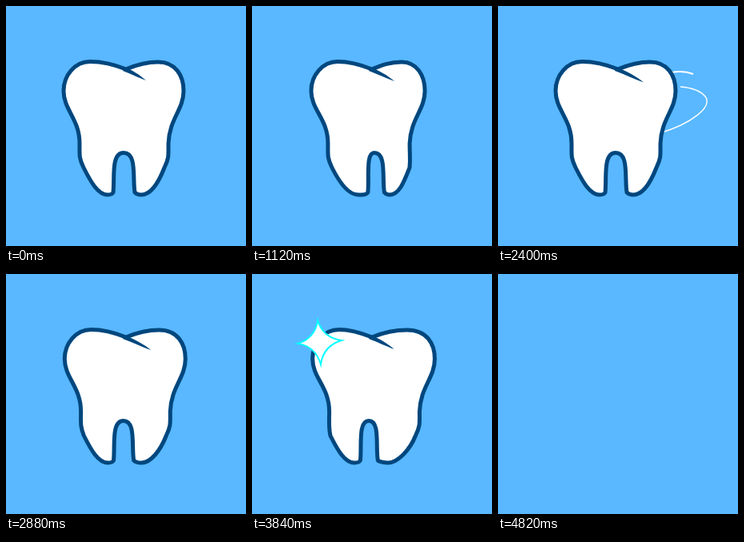
An HTML page that plays this animation: 300x300 px, repeating every 4840 ms.

```html
<!DOCTYPE html>
<html lang="en">
<head>
<meta charset="utf-8">
<title>Sparkling tooth</title>
<style>
  html, body { margin: 0; width: 100%; height: 100%; overflow: hidden; background: #59b8ff; }
  svg { display: block; width: 100%; height: 100%; }
</style>
</head>
<body>
<svg viewBox="0 0 300 300">
  <defs>
    <linearGradient id="fade" gradientUnits="userSpaceOnUse" x1="36" y1="0" x2="266" y2="0">
      <stop offset="0" stop-color="#fff" stop-opacity=".35"/>
      <stop offset="1" stop-color="#fff" stop-opacity=".7"/>
    </linearGradient>
  </defs>
  <g id="scene">
    <g fill="none">
      <g stroke="url(#fade)">
        <path id="orbit1" pathLength="1" d="M45 114C20 130 45 160 97 166C130 171 165 172 198 165C240 152 273 121 264 107C259 99 246 96 231 97"/>
        <path id="dash1" pathLength="1" d="M219 80Q232 76.500 245 78.500"/>
      </g>
      <g stroke="#fff">
        <path id="orbit2" pathLength="1" stroke-width="1.400" d="M38 114C10 130 38 160 96 168C130 172 166 170 202 159C242 147 269 126 259 113C253 106 241 102 228 101"/>
        <path id="dash2" pathLength="1" stroke-width="2" d="M217 83Q232 80.500 244 85"/>
      </g>
    </g>
    <path id="tooth" fill="#fff" stroke="#00477e" stroke-width="5" stroke-linejoin="round"/>
    <path id="crease" fill="#00477e"/>
    <path id="star" fill="#fff" stroke="#0ff" stroke-width="2" stroke-miterlimit="8"
      d="M0-27Q5-5 28 0Q5 5 0 28Q-5 5-27 0Q-5-5 0-27Z"/>
  </g>
</svg>
<script>
const LOOP = 4840, QUARTER = LOOP / 4;
const el = id => document.getElementById(id);

// Eased 0..1 progress of t between two times
function ease(t, from, to) {
  const k = Math.min(1, Math.max(0, (t - from) / (to - from)));
  return k * k * (3 - 2 * k);
}

// Turn of the tooth: 0, 1, 0, -1, 0 at the quarters of the loop
const turnAt = t =>
  ease(t, 0, QUARTER) - ease(t, QUARTER, 2 * QUARTER)
  - ease(t, 2 * QUARTER, 3 * QUARTER) + ease(t, 3 * QUARTER, LOOP);

function toothPath(turn) {
  const part = (right, left) => x => x + (turn > 0 ? right * turn : -left * turn);
  const lobeL = part(2, 4), wallL = part(3, 5), shinL = part(3, 1), footL = part(6, 1),
        gapL = part(11, 1.5), gapTop = part(6, -1), gapR = part(4.5, -4),
        footR = part(3, 1), shinR = part(-1, 7), wallR = part(-6, 7),
        lobeR = part(-6, 7), topR = part(-3, 4);
  return `M150 79C130 71 118 69.5 ${lobeL(105)} 69.5
    C${lobeL(86)} 69.5 ${lobeL(72)} 87 ${lobeL(72)} 106
    C${lobeL(72)} 130 ${wallL(92)} 141 ${wallL(92)} 172
    C${wallL(92)} 186 ${wallL(91)} 190 ${shinL(97)} 202
    C${shinL(106)} 220 ${footL(115)} 236 ${footL(127)} 236
    C${gapL(131)} 236 ${gapL(133)} 235 ${gapL(134)} 233
    C${gapL(136)} 215 ${gapL(131)} 183.5 ${gapTop(147)} 183.5
    C${gapR(164)} 183.5 ${gapR(158)} 215 ${gapR(161)} 233
    C${gapR(163)} 235 ${footR(166)} 236 ${footR(169)} 236
    C${footR(181)} 236 ${shinR(191)} 220 ${shinR(198)} 202
    C${wallR(204)} 190 ${wallR(203)} 186 ${wallR(203)} 172
    C${wallR(204)} 141 ${lobeR(222)} 130 ${lobeR(222)} 106
    C${lobeR(222)} 87 ${lobeR(212)} 70 ${topR(190)} 70
    C${topR(175)} 70 162 74 150 79Z`;
}

function creasePath(slide) {
  const x = 175 + 7 * slide, y = 93 + 2.5 * slide;
  return `M147 76C158 80 ${x - 8} ${y - 7} ${x} ${y}C${x - 11} ${y - 4} 158 85.5 146 81Z`;
}

// Shows the stretch of a line between its tail and its head
function trim(id, head, tail) {
  const shown = head - tail;
  el(id).style.visibility = shown > 0.001 ? "visible" : "hidden";
  el(id).setAttribute("stroke-dasharray", `${shown} 2`);
  el(id).setAttribute("stroke-dashoffset", -tail);
}

function draw(t) {
  el("scene").style.display = t < 4815 ? "" : "none";
  el("tooth").setAttribute("d", toothPath(turnAt(t)));
  el("crease").setAttribute("d", creasePath(ease(t, 0, LOOP / 2) - ease(t, LOOP / 2, LOOP)));

  trim("orbit1", ease(t, 100, 580), ease(t, 600, 1080));
  trim("dash1", ease(t, 350, 600), ease(t, 650, 1080));
  trim("orbit2", ease(t, 1740, 2200), ease(t, 2160, 2690));
  trim("dash2", ease(t, 2050, 2320), ease(t, 2420, 2700));

  const size = ease(t, 3200, 3780) - ease(t, 4200, LOOP);
  el("star").style.visibility = size > 0 ? "visible" : "hidden";
  el("star").setAttribute("transform", `translate(84 85) rotate(-4) scale(${size})`);
}

const start = performance.now();
function tick() {
  draw((performance.now() - start) % LOOP);
  requestAnimationFrame(tick);
}
tick();
</script>
</body>
</html>
```
